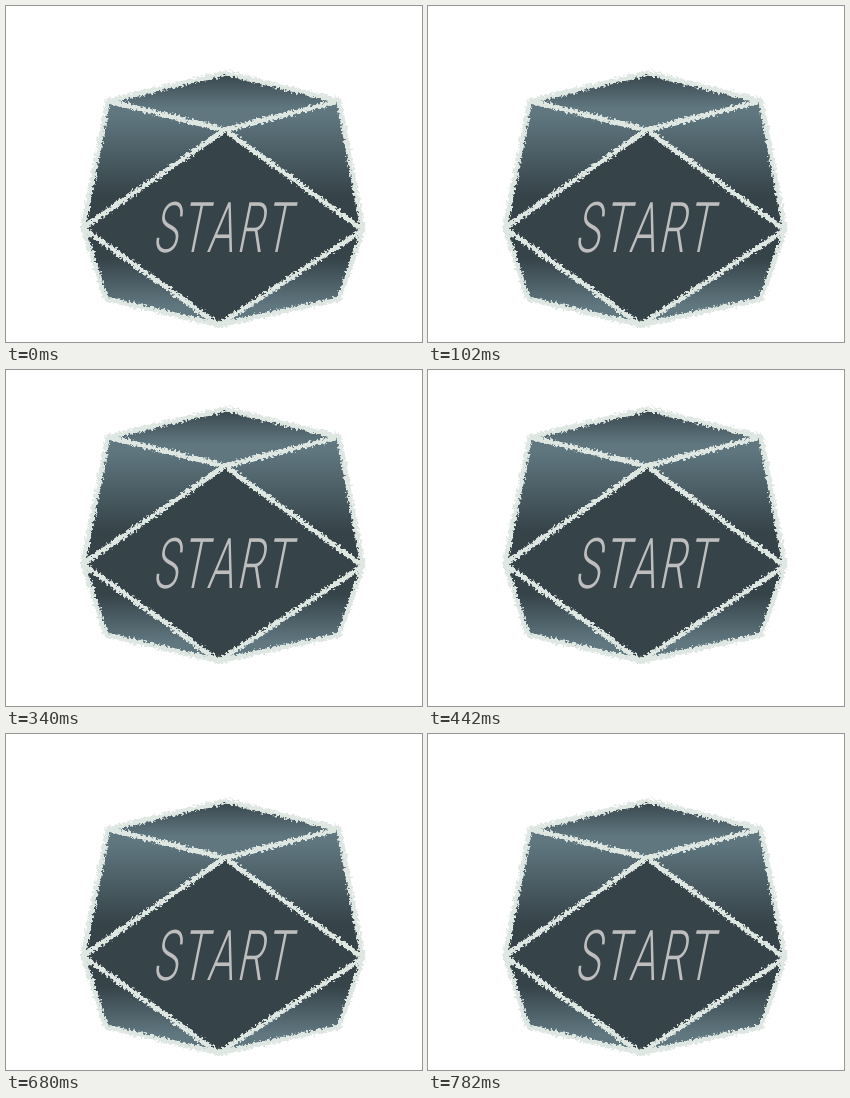
An HTML page without scripts for the animation above (0.85 s loop, 416x336 px).

```html
<!DOCTYPE html>
<html lang="en">
<head>
<meta charset="utf-8">
<title>Start button</title>
<style>
  html, body { margin: 0; width: 100%; height: 100%; overflow: hidden; background: #fff; }
  svg { display: block; width: 100%; height: 100%; }
  .gem { animation: bob 850ms step-end infinite; }
  .edges { fill: none; stroke: #dfe7e3; stroke-width: 5; stroke-linejoin: round; }
  .label {
    font: 300 70px Roboto, "Liberation Sans", sans-serif;
    letter-spacing: 5px;
    text-anchor: middle;
    fill: #bebebe;
  }
  @keyframes bob {
    0%, 80%, 100% { transform: translateY(0); }
    20%, 60% { transform: translateY(-16px); }
    40% { transform: translateY(-28px); }
  }
</style>
</head>
<body>
<svg viewBox="0 0 416 336" role="img" aria-label="Start">
  <defs>
    <linearGradient id="crown" gradientUnits="userSpaceOnUse" x1="0" y1="66" x2="0" y2="102">
      <stop offset="0" stop-color="#364349"/>
      <stop offset="1" stop-color="#607780"/>
    </linearGradient>
    <linearGradient id="side" gradientUnits="userSpaceOnUse" x1="0" y1="108" x2="0" y2="190">
      <stop offset="0" stop-color="#607780"/>
      <stop offset="1" stop-color="#364349"/>
    </linearGradient>
    <linearGradient id="base" gradientUnits="userSpaceOnUse" x1="0" y1="252" x2="0" y2="300">
      <stop offset="0" stop-color="#364349"/>
      <stop offset="1" stop-color="#607780"/>
    </linearGradient>

    <!-- Chalky, crumbling strokes -->
    <filter id="chalk" filterUnits="userSpaceOnUse" x="50" y="40" width="330" height="296" color-interpolation-filters="sRGB">
      <feTurbulence type="fractalNoise" baseFrequency=".4" numOctaves="2" seed="4"/>
      <feDisplacementMap in="SourceGraphic" scale="7" xChannelSelector="R" yChannelSelector="G"/>
    </filter>

    <path id="hull" d="M220 67 333 95 357 224 333 293 213 319 100 293 77 222 102 95Z"/>
  </defs>

  <g class="gem">
    <path fill="url(#crown)" d="M220 67 333 95 219 124 102 95Z"/>
    <path fill="url(#side)" d="M102 95 219 124 77 222ZM333 95 357 224 219 124Z"/>
    <path fill="url(#base)" d="M77 222 213 319 100 293ZM357 224 333 293 213 319Z"/>
    <path fill="#364349" d="M219 124 357 224 213 319 77 222Z"/>
    <g class="edges" filter="url(#chalk)">
      <use href="#hull"/>
      <path d="M102 95 219 124 333 95M77 222 219 124 357 224 213 319Z"/>
    </g>
    <text class="label" transform="translate(216 246) skewX(-11.3) scale(.6 1)">START</text>
  </g>
</svg>
</body>
</html>
```
